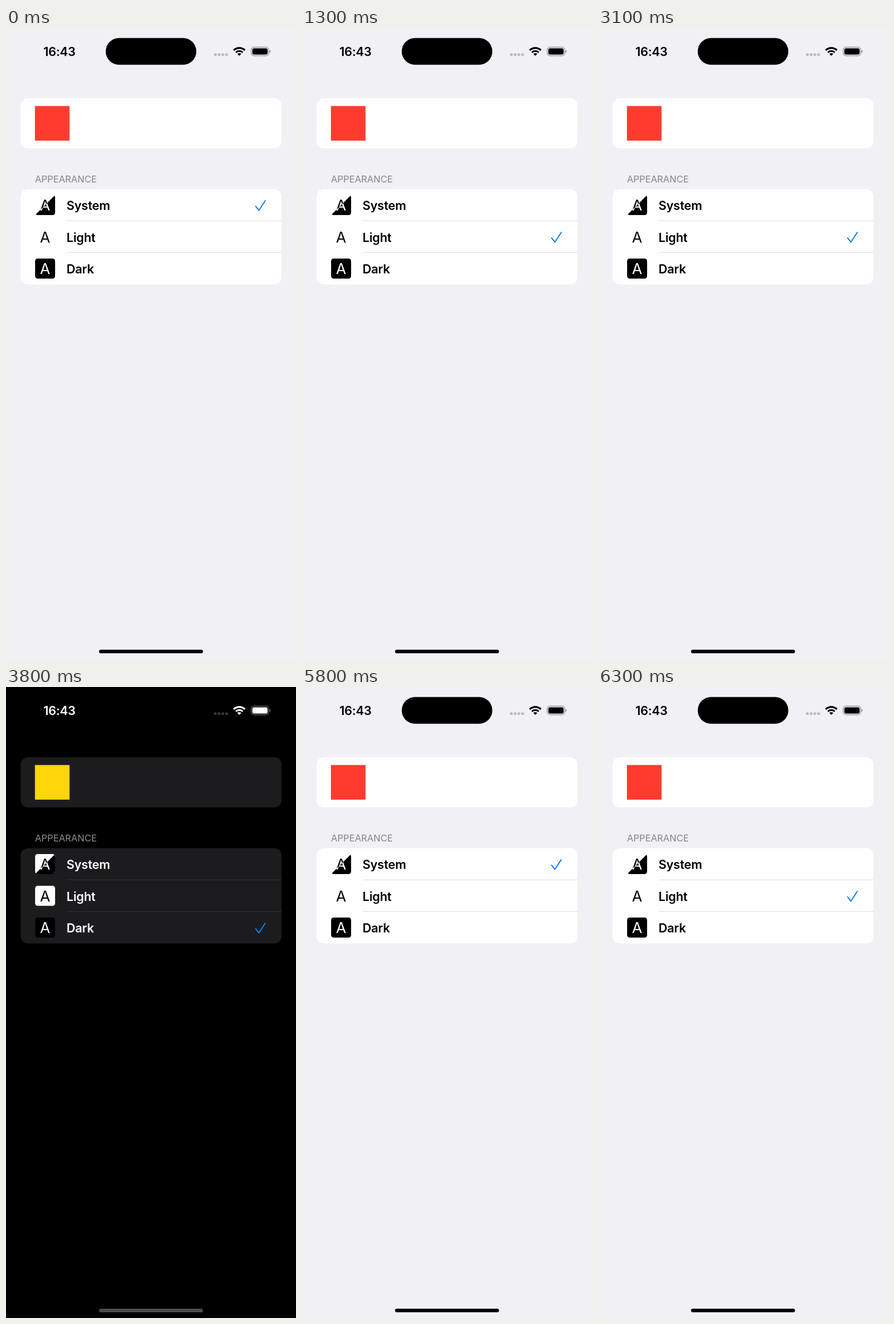
Recreate the animation shown at these times as an HTML page. Size 508x1103 px, loop 6.8 s.

```html
<!DOCTYPE html>
<html lang="en">
<head>
<meta charset="utf-8">
<title>Appearance settings</title>
<style>
  html, body { margin: 0; width: 100%; height: 100%; overflow: hidden; }
  svg {
    display: block; width: 100%; height: 100%;
    font-family: Inter, Roboto, sans-serif;
    --bg: #f1f0f5; --card: #fefefe; --ink: #000; --status: #000; --head: #85858a;
    --line: #dedee0; --swatch: #ff3b30; --tick: #0a78ee; --home: #000;
  }
  svg.dark {
    --bg: #000; --card: #1c1c1e; --ink: #fff; --status: #fff; --head: #8d8d93;
    --line: #303032; --swatch: #ffd60a; --tick: #0a84ff; --home: #4c4c4c;
  }
  svg.stale { --status: #fff; }
  .bg { fill: var(--bg); }
  .card { fill: var(--card); }
  .swatch { fill: var(--swatch); }
  .home { fill: var(--home); }
  .head { fill: var(--head); font-size: 16.3px; letter-spacing: -.05px; }
  .label { fill: var(--ink); font-size: 21.4px; font-weight: 600; letter-spacing: -.2px; }
  .line { stroke: var(--line); stroke-width: 1.2; }
  .status { fill: var(--status); stroke: none; }
  .ring { fill: none; stroke: var(--status); }
  .time { font-size: 21.5px; font-weight: 600; letter-spacing: -.3px; text-anchor: middle; }
  .glyph { font-size: 26px; text-anchor: middle; }
  #tick { fill: none; stroke: var(--tick); stroke-width: 1.9; stroke-linecap: round; stroke-linejoin: round; }
</style>
</head>
<body>
<svg id="screen" viewBox="0 0 508 1103">
  <defs>
    <clipPath id="wedge"><path d="M408.7 48.7l-20-20h40z"/></clipPath>
    <clipPath id="lower"><path d="M86 292V327H51z"/></clipPath>
    <g id="lightIcon">
      <rect class="plate" x="51" y="292" width="35" height="35" rx="4.5" fill="#fefefe"/>
      <text class="glyph" x="68.5" y="319">A</text>
    </g>
    <g id="darkIcon">
      <rect x="51" y="292" width="35" height="35" rx="4.5"/>
      <text class="glyph" x="68.5" y="319" fill="#fff">A</text>
    </g>
  </defs>

  <rect class="bg" width="508" height="1103"/>

  <!-- Status bar -->
  <text class="status time" x="93.5" y="49">16:43</text>
  <rect x="174.7" y="17.5" width="158.7" height="46.7" rx="23.3"/>
  <g class="status" opacity=".22">
    <circle cx="366.7" cy="46.5" r="2.5"/>
    <circle cx="373.3" cy="46.5" r="2.5"/>
    <circle cx="379.9" cy="46.5" r="2.5"/>
    <circle cx="386.5" cy="46.5" r="2.5"/>
  </g>
  <g clip-path="url(#wedge)">
    <circle class="status" cx="408.7" cy="48.7" r="4.8"/>
    <circle class="ring" cx="408.7" cy="48.7" r="8.5" stroke-width="3"/>
    <circle class="ring" cx="408.7" cy="48.7" r="13.8" stroke-width="3.2"/>
  </g>
  <rect class="ring" x="429.5" y="33.4" width="30.8" height="15.2" rx="5" stroke-width="1.3" opacity=".4"/>
  <path class="status" d="M461.8 38.6q1.8.6 1.8 2.4t-1.8 2.4z" opacity=".45"/>
  <rect class="status" x="431.5" y="35.4" width="26.8" height="11.2" rx="3.3"/>

  <!-- Preview -->
  <rect class="card" x="25.5" y="122.7" width="457.2" height="87.8" rx="13"/>
  <rect class="swatch" x="50.7" y="136.4" width="60.6" height="60.5"/>

  <!-- Options -->
  <text class="head" x="50.8" y="270.3">APPEARANCE</text>
  <rect class="card" x="25.5" y="281.7" width="457.2" height="166.5" rx="13"/>
  <path class="line" d="M106.5 337H482.7M106.5 392.5H482.7"/>
  <use href="#lightIcon"/>
  <g clip-path="url(#lower)"><use href="#darkIcon"/></g>
  <use href="#lightIcon" y="55.5"/>
  <use href="#darkIcon" y="111"/>
  <text class="label" x="106" y="318">System</text>
  <text class="label" x="106" y="373.5">Light</text>
  <text class="label" x="106" y="429">Dark</text>
  <path id="tick" d="M437.3 311.6L443 318.7L454.2 301.8"/>

  <rect class="home" x="163" y="1086.8" width="182" height="6.2" rx="3.1"/>
</svg>
<script>
  const LOOP = 6800, ROW = 55.5;
  const SYSTEM = 0, LIGHT = 1, DARK = 2;
  // [start in ms, chosen row]
  const choices = [[0, SYSTEM], [1300, LIGHT], [2500, SYSTEM], [3100, LIGHT],
                   [3800, DARK], [5100, LIGHT], [5800, SYSTEM], [6300, LIGHT]];
  const screenEl = document.getElementById('screen');
  const tick = document.getElementById('tick');

  function draw(now) {
    const t = now % LOOP;
    const row = choices.findLast(([start]) => t >= start)[1];
    screenEl.classList.toggle('dark', row === DARK);
    // The status bar lags behind the switch back to light
    screenEl.classList.toggle('stale', t >= 5100 && t < 5200);
    tick.setAttribute('transform', `translate(0 ${row * ROW})`);
  }

  const begin = performance.now();
  function loop() {
    draw(performance.now() - begin);
    requestAnimationFrame(loop);
  }
  loop();
</script>
</body>
</html>
```
